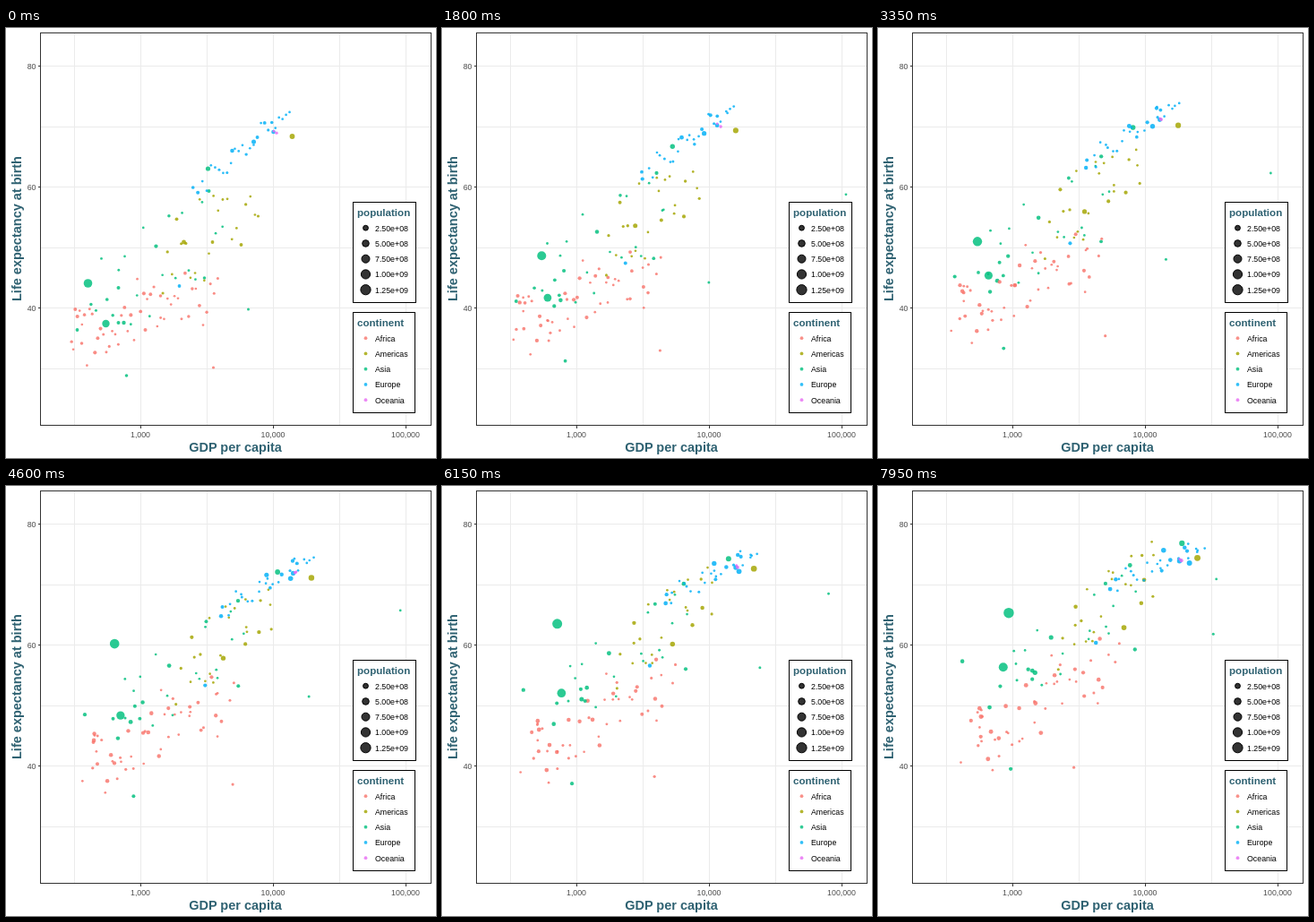
Animation, 480 px wide and 480 px high, one loop 8000 ms. Source, as an HTML page:

```html
<!DOCTYPE html>
<html lang="en">
<head>
<meta charset="utf-8">
<title>Life expectancy and GDP</title>
<style>
  html, body { margin: 0; width: 100%; height: 100%; overflow: hidden; background: #fff; }
  svg { display: block; width: 100vw; height: 100vh; font: 8.8px "Liberation Sans", Arial, sans-serif; }
  .axis { fill: #4d4d4d; }
  .title { fill: #2f6272; font-weight: bold; }
</style>
</head>
<body>
<svg id="stage" viewBox="0 0 480 480"></svg>
<script>
const LOOP = 8000, STEP = 50;
const SPAN = 8155; // six five-year intervals

const COLORS = {
  Africa: "#f8766d", Americas: "#a3a500", Asia: "#00bf7d",
  Europe: "#00b0f6", Oceania: "#e76bf3"
};

// Prominent dots: continent, radius, then x, y stops evenly spaced over SPAN.
const TRACKS = [
  ["Asia", 4.8, 91, 285, 114, 241, 104, 282, 118, 188, 125, 157, 131, 151, 148, 140],
  ["Asia", 4.2, 111, 330, 140, 199],
  ["Asia", 2.6, 225, 157, 297, 101, 341, 62],
  ["Asia", 2.2, 131, 329, 133, 272, 177, 205],
  ["Asia", 2, 125, 329, 124, 245],
  ["Asia", 2, 125, 290, 173, 204],
  ["Asia", 1.4, 451, 208, 454, 191, 443, 175, 432, 147, 452, 126, 412, 115, 371, 102],
  ["Asia", 1.5, 270, 314, 332, 246, 376, 161],
  ["Asia", 1.8, 221, 279, 288, 180],
  ["Asia", 1.8, 134, 388, 148, 314],
  ["Asia", 1.9, 79, 337, 94, 192],
  ["Americas", 2.9, 319, 121, 338, 106, 357, 79],
  ["Americas", 2.4, 198, 239, 276, 156],
  ["Americas", 1.9, 230, 239, 295, 128],
  ["Americas", 1.6, 281, 210, 307, 121],
  ["Europe", 2.5, 276, 127, 349, 85],
  ["Europe", 2.3, 298, 116, 337, 83],
  ["Europe", 2.3, 252, 137, 320, 70],
  ["Europe", 1.9, 193, 288, 244, 172],
  ["Africa", 2, 155, 337, 182, 274],
  ["Africa", 1.8, 172, 299, 230, 206],
  ["Africa", 1.8, 84, 352, 115, 278],
  ["Africa", 1.6, 231, 379, 258, 336, 216, 313]
];

// Remaining dots scatter about a sloping line that shifts over time.
// Each line gives y at x = 150, slope, and spread.
const CLOUDS = {
  Africa:   { count: 48, lo: 72, hi: 238, skew: 1.2, start: [320, -0.2, 50], end: [254, -0.45, 58], drift: [28, 36] },
  Americas: { count: 21, lo: 172, hi: 280, skew: 1, start: [276, -0.45, 62], end: [230, -0.95, 42], drift: [28, 18] },
  Asia:     { count: 22, lo: 92, hi: 245, skew: 1.1, start: [278, -0.6, 62], end: [214, -0.72, 40], drift: [48, 38] },
  Europe:   { count: 26, lo: 205, hi: 318, skew: 0.9, start: [220, -0.75, 20], end: [137, -0.31, 18], drift: [52, 12] },
  Oceania:  { count: 2, lo: 297, hi: 303, skew: 1, start: [116, 0, 2], end: [136, -0.29, 2], drift: [38, 2] }
};

const stage = document.getElementById("stage");

function add(tag, attrs, text) {
  const node = document.createElementNS("http://www.w3.org/2000/svg", tag);
  for (const key in attrs) node.setAttribute(key, attrs[key]);
  if (text) node.textContent = text;
  stage.append(node);
  return node;
}

const line = (x1, y1, x2, y2, stroke) => add("line", { x1, y1, x2, y2, stroke });
const box = (x, y, width, height, stroke, fill) => add("rect", { x, y, width, height, stroke, fill });
const label = (text, x, y, attrs) => add("text", { x, y, ...attrs }, text);

let seed = 1952;
function random() {
  seed = (seed * 1664525 + 1013904223) % 4294967296;
  return seed / 4294967296;
}
const signed = () => random() + random() - 1;

function cloudTracks(name) {
  const { count, lo, hi, skew, start, end, drift } = CLOUDS[name];
  const yOn = ([base, slope, spread], x, offset) => base + slope * (x - 150) + spread * offset;
  return Array.from({ length: count }, (_, i) => {
    const x0 = lo + (hi - lo) * ((i + 0.5) / count) ** skew;
    const x1 = x0 + drift[0] + drift[1] * signed();
    const offset = signed();
    const y0 = yOn(start, x0, offset), y1 = yOn(end, x1, offset);
    const stops = [];
    for (let k = 0; k <= 6; k++) {
      const wobble = k % 6 ? 4 : 0;
      stops.push(x0 + (x1 - x0) * k / 6 + wobble * signed(), y0 + (y1 - y0) * k / 6 + wobble * signed() / 2);
    }
    return [name, 1.35 + 0.8 * random() ** 3, ...stops];
  });
}

function drawPanel() {
  for (let i = 0; i < 6; i++) {
    const x = 76.5 + 74 * i, y = Math.floor(42.7 + 67.5 * i) + 0.5;
    line(x, 6, x, 443, "#ebebeb");
    line(39, y, 474, y, "#ebebeb");
  }
}

function drawAxes() {
  box(38.5, 5.5, 436, 438, "#333", "none");
  ["1,000", "10,000", "100,000"].forEach((text, i) => {
    const x = 150.5 + 148 * i;
    line(x, 444, x, 447, "#333");
    label(text, x - 0.5, 457, { class: "axis", "text-anchor": "middle" });
  });
  [80, 60, 40].forEach((value, i) => {
    const y = 42.5 + 135 * i;
    line(36, y, 39, y, "#333");
    label(value, 33.5, y + 3.5, { class: "axis", "text-anchor": "end" });
  });
  const title = { class: "title", "text-anchor": "middle", "font-size": 14.5 };
  label("GDP per capita", 256, 473, title);
  label("Life expectancy at birth", 0, 0, { ...title, transform: "translate(17 224) rotate(-90)" });
}

function drawLegend(title, top, width, rows) {
  box(387.5, top + 0.5, width, 112, "#000", "#fff");
  label(title, 392, top + 16, { class: "title", "font-size": 11.6 });
  rows.forEach(([text, r, fill, stroke], i) => {
    const cy = top + 29.2 + 17.25 * i;
    add("circle", { cx: 401.5, cy, r, fill, stroke, "fill-opacity": 0.8 });
    label(text, 412, cy + 3.3);
  });
}

drawPanel();
const dots = [...TRACKS, ...Object.keys(CLOUDS).flatMap(cloudTracks)].map(([name, r, ...stops]) => ({
  r, stops, node: add("circle", { fill: COLORS[name], "fill-opacity": 0.83 })
}));
drawAxes();
drawLegend("population", 194, 70, ["2.50e+08", "5.00e+08", "7.50e+08", "1.00e+09", "1.25e+09"]
  .map((text, i) => [text, 0.7 + 2.2 * Math.sqrt(i + 1), "#000", "#000"]));
drawLegend("continent", 317, 69, Object.entries(COLORS).map(([name, color]) => [name, 1.9, color, "none"]));

function render(time) {
  const progress = time / SPAN;
  for (const { node, r, stops } of dots) {
    const position = progress * (stops.length / 2 - 1);
    const k = Math.floor(position), part = position - k;
    const at = axis => stops[2 * k + axis] * (1 - part) + stops[2 * k + 2 + axis] * part;
    node.setAttribute("cx", at(0) + 0.5);
    node.setAttribute("cy", at(1));
    node.setAttribute("r", r > 1.7 ? r * (1 + 0.2 * progress) : r);
  }
}

const origin = performance.now();
function tick() {
  const elapsed = (performance.now() - origin) % LOOP;
  render(Math.floor(elapsed / STEP) * STEP);
  requestAnimationFrame(tick);
}
tick();
</script>
</body>
</html>
```
